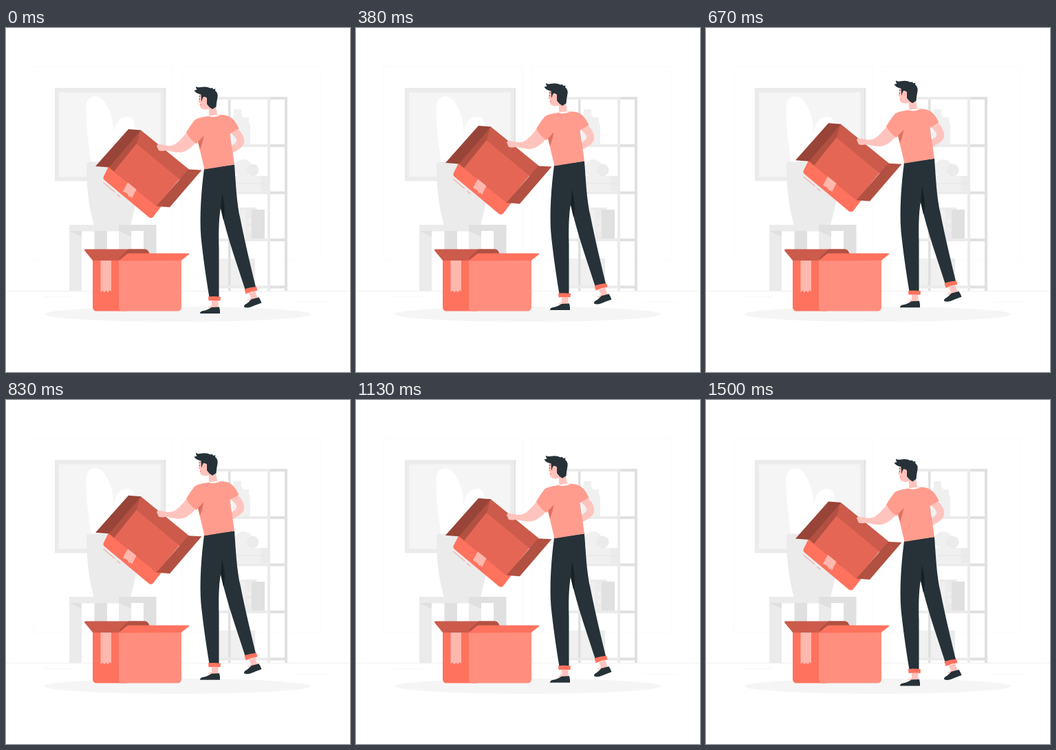
Recreate the animation shown at these times as an HTML page. Size 500 by 500 pixels, loop 1.54 s.

```html
<!DOCTYPE html>
<html lang="en">
<head>
<meta charset="utf-8">
<title>Unpacking boxes</title>
<style>
  html, body { margin: 0; width: 100%; height: 100%; overflow: hidden; background: #fff; }
  svg { display: block; width: 100vw; height: 100vh; }
  .g0 { fill: #f5f5f5 }
  .g1 { fill: #f0f0f0 }
  .g2 { fill: #ebebeb }
  .g3 { fill: #e0e0e0 }
  .red { fill: #ff725e }
  .light { fill: #ff8e7e }
  .tape { fill: #ffb8ae }
  .shade { fill: #cc5b4b }
  .skin { fill: #ffc3bd }
  .ink { fill: #263238 }
  .line { fill: none; stroke: #ff725e; stroke-width: .8; stroke-linecap: round }
</style>
</head>
<body>
<svg viewBox="0 0 500 500">
  <g id="room">
    <path d="M40 55.500h202.500v282H40zM255.500 55.500H458v282H255.500z" fill="none" stroke="#fafafa"/>
    <path d="M0 382.500h500" stroke="#ebebeb" stroke-width=".7"/>
    <path d="M54 390.500h42M418 398.500h49" stroke="#f5f5f5" stroke-width=".7"/>

    <path class="g2" d="M71 87h161v135.500H71z"/>
    <path class="g3" d="M230.500 87h1.500v135.500h-1.500z"/>
    <path class="g0" d="M77 93.500h147.500v123H77z"/>
    <path fill="#fff" d="M124 197C119 165 116 135 116.500 115C117 95 137 95 145 110C153 124 156 135 156.500 153C159 135 168 129 176 129C185 129 187 136 187 146C187 165 184 182 178 197z"/>
    <path class="g2" d="M120 194.500H192Q195 194.500 195 198C195 235 187 262 181 287H128C121 262 117 235 117 198Q117 194.500 120 194.500z"/>

    <path class="g2" d="M92 286h72v9.500h-54V382H92zM164 295h18v60h-18z"/>
    <path class="g3" d="M164 286h54.500v96H200v-87h-36zM128.500 295H147v60h-18.500zM92 295h18v8.500zM164 295h18v8.500z"/>
  </g>

  <g id="shelf">
    <path class="g1" d="M331 118h11v8q2 4 5 4h6v7q2 2 2 5v27h-26v-36q0-4 2-6z"/>
    <circle class="g1" cx="345" cy="204" r="13"/>
    <circle class="g2" cx="358.500" cy="206.500" r="9"/>
    <path class="g1" d="M330 215h40v22.500h-40zM309 335h53v40h-53z"/>
    <path class="g2" d="M370 215h10.500v22.500H370zM340 261h24.500v45H340zM347 335h15v40h-15z"/>
    <path d="M330 226h50" stroke="#e6e6e6"/>
    <path class="g3" d="M357 264h19v42h-19z"/>
    <path class="g1" d="M350.500 278h6v6h-6zM350.500 289h6v6h-6zM342 264h6v42h-6z"/>
    <path class="g3" d="M323 104h3.500v278H323zM384 100h25v282h-4V104h-21z"/>
    <path class="g3" d="M384 169h22v4h-22zM384 237.500h22v4h-22zM384 306h22v4h-22zM384 374.500h22v4h-22z"/>
    <path class="g2" d="M300 100h84v282h-4V104h-80zM300 169h81v4h-81zM300 237.500h81v4h-81zM300 306h81v4h-81zM300 374.500h81v4h-81z"/>
  </g>

  <ellipse class="g0" cx="249.500" cy="416" rx="193.500" ry="11"/>

  <g id="openBox">
    <path class="shade" d="M116 321.500H202Q205 321.500 206.500 324L212 334L164 339H127L114.500 324Q113 321.500 116 321.500z"/>
    <path fill="#b25042" d="M165 334L178 321.500H202Q205 321.500 206.500 324L209 329L165 338z"/>
    <path class="red" d="M126 338h50v73.500h-44q-6 0-6-6z"/>
    <path class="light" d="M164 337h91v68.500q0 6-6 6h-79q-6 0-6-6z"/>
    <path class="red" d="M163.500 338.500L175 329Q176.500 327.500 179 327.500H265.500Q267 328 266 329L254.500 338z"/>
    <path class="tape" d="M137.500 338H153v45l-2.500-2-2.500 3.500-2.500-3-2.500 3-2.500-3-3 2.500z"/>
  </g>

  <g id="floating">
    <path class="skin" d="M335 145C343 152 347 160 346 167C345 173 338 178 329 182L327 172C333 169 336 166 335 163C334 159 330 156 325 152z"/>

    <path class="ink" d="M288 205L332 199C334 225 335 255 341 280C348 315 356 348 363 377L348 382C337 347 322 307 312 262C309 280 309 300 309.500 320L309.500 392H295.500C291 365 286 330 283.500 305C281 275 284 235 288 205z"/>
    <path d="M314 240C318 255 319 270 316 280L312 262z" fill="#172025"/>
    <path class="skin" d="M299 396h9.500v12H299zM353 386l9-3 4 11-8 3z"/>
    <path class="red" d="M294 391Q303 390 312 391.500L311.500 397Q303 396 294.500 397zM346.500 380Q355 377 364 376.500L365.500 382Q357 383 348.500 387z"/>
    <path class="ink" d="M282 415.500Q282 412 287 411.500Q294 410 298 406.500L310 406Q311.500 411 311 415.500zM346 406Q345.500 403 350 401Q354 398 356 395L367.500 392Q370 395.500 371.500 400Q363 403 356 406Q350 408 346 406z"/>
    <path d="M294 406l4 1M296 404l3 1.500M351 395.500l5 .5M354 393.500l3 1" fill="none" stroke="#ff9c8e" stroke-width=".8"/>

    <g id="tiltedBox">
      <path class="red" d="M149 202L227 258L214 275Q210.500 278 207 275L143 221.500Q140.500 219 142 216z"/>
      <path fill="#e56655" d="M190 167L253 219L219 260L149 203z"/>
      <path class="shade" d="M196 149L266 206L253 221L189 168z"/>
      <path fill="#b25042" d="M196 149L190 168L157 209L149 202z"/>
      <path fill="#994438" d="M130 201.500L178 147.500L196.500 149L149.500 203z"/>
      <path fill="#b25042" d="M265 206L284.500 207L238 261L218.500 259.500z"/>
      <path class="tape" d="M177 225L189.500 235L183 248L181 245L179 246L176 241L170 238z"/>
      <path class="line" d="M142 225.500l16 13.500M161.500 242.500l4.500 3.500"/>
    </g>

    <path class="skin" d="M263 152C256 160 250 168 242 171C235 173 230 170 222 169.500Q218 170 219.500 173L222 178.500Q227 180 232 178.500C242 180 251 183 259 180C267 177 273 170 277 166z"/>

    <path class="skin" d="M280.500 95L281 101L279.500 108L282 110Q281 116 285 118Q290 120 295 118L295 127Q301 131 307 126L305 114L300 95z"/>
    <path class="ink" d="M273.500 91Q276 91 277.500 90Q275.500 88 276 85.500Q278 87.500 283 86.500Q292 85 297 88L300 87.500L301 89.500L304.500 89L304 91.500Q308.500 95 307.500 101Q306 108 305.500 115L300 118.500Q295 116 292 111V102L287 100.500L284 107.500L283.500 97Q276 96 273.500 91z"/>
    <ellipse class="skin" cx="288.500" cy="105.500" rx="3.200" ry="5"/>
    <path d="M287.500 103q2 1.500 1.500 4" fill="none" stroke="#ff9c8e" stroke-width=".7"/>
    <path d="M280.500 100l2-.8M281.500 103v1.500" stroke="#263238" stroke-width=".9"/>
    <path d="M281.500 112l2.500.5" stroke="#ff725e" stroke-width=".8"/>

    <path fill="#ff9c8e" d="M262 152Q268 142 274 134.500C280 130 288 130 294 128.500C304 125.500 320 126 326 130C332 134 336 141 338.500 146.500L325.500 154L332 199L288.500 206L279 166L276.500 168.500Q267 162 262 152z"/>
    <path d="M294 128.500Q302 131.500 312 127Q303 126 294 128.500z" fill="#fff"/>
    <path class="shade" opacity=".65" d="M287.500 157L279 166L282 177Q286 167 287.500 157z"/>
  </g>
</svg>
<script>
  const LOOP = 1540, STEPS = 37, RISE = 10;
  const floating = document.getElementById('floating');
  const start = performance.now();

  // Linear rise and fall, held at a steady 24 steps per second.
  function draw() {
    const t = (performance.now() - start) % LOOP;
    const step = Math.floor((t + 6) * STEPS / LOOP) + 1;
    const p = step / STEPS % 1;
    const lift = RISE * (1 - Math.abs(1 - 2 * p));
    floating.setAttribute('transform', `translate(0 ${-lift})`);
    requestAnimationFrame(draw);
  }
  draw();
</script>
</body>
</html>
```
